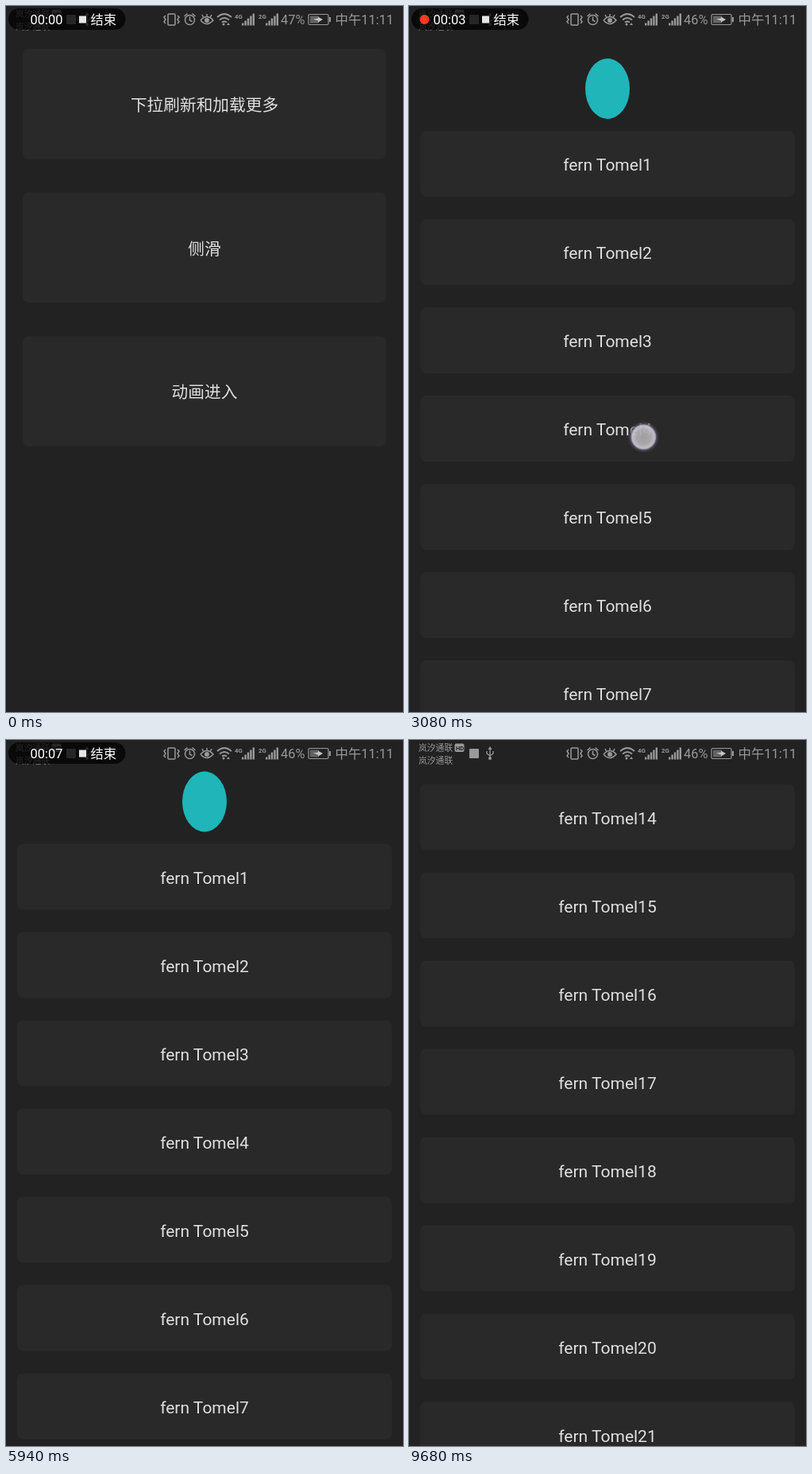
Write an HTML page that moves like this. It is 500 by 888 pixels and loops after 9900 ms.

```html
<!DOCTYPE html>
<html lang="zh">
<head>
<meta charset="utf-8">
<title>List refresh demo</title>
<style>
  html, body { margin: 0; width: 100%; height: 100%; overflow: hidden; background: #222; }
  svg { display: block; width: 500px; height: 888px; }
  text { font-family: Roboto, "Noto Sans CJK SC", "Noto Sans CJK", sans-serif; }
  .card { fill: #292929; }
  .label { fill: #e0e0e0; font-size: 21px; text-anchor: middle; }
  .home { font-size: 20.7px; }
  .status { fill: #999; font-size: 16.4px; }
  .carrier { font-size: 10.8px; }
  .net { font-size: 7.8px; font-weight: 700; }
  .line { fill: none; stroke: #999; stroke-width: 1.5; }
</style>
</head>
<body>
<svg viewBox="0 0 500 888">
  <defs>
    <radialGradient id="touchFill">
      <stop offset="0" stop-color="#a5a3a6"/>
      <stop offset=".45" stop-color="#b0aeb2"/>
      <stop offset=".68" stop-color="#c8c5ce"/>
      <stop offset=".74" stop-color="#a5a0b4"/>
      <stop offset=".8" stop-color="#575165" stop-opacity=".9"/>
      <stop offset="1" stop-color="#38343f" stop-opacity="0"/>
    </radialGradient>
  </defs>
  <rect width="500" height="888" fill="#222"/>
  <g id="home"></g>
  <g id="list">
    <g id="items"></g>
    <g id="footer">
      <g id="spinner"></g>
      <text x="196" y="2294.5" fill="#aaa" font-size="18.5">正在加载中...</text>
    </g>
  </g>
  <ellipse id="mascot" cx="250" fill="#1fb5b9"/>
  <rect width="500" height="33" fill="#222"/>

  <g class="status">
    <g class="carrier">
      <text x="12" y="13.5">岚汐通联</text>
      <text x="12" y="29.5">岚汐通联</text>
    </g>
    <rect x="57.5" y="4.5" width="12" height="10.5" rx="2"/>
    <text x="59" y="12.6" font-size="7.5" font-weight="700" style="fill:#222">HD</text>
    <rect x="76" y="11" width="12" height="12" rx="1"/>
    <path class="line" style="stroke-width:1.3" d="M102 11V23M98 14v3l4 3l4-3v-3"/>
    <path d="M102 8l2.5 4h-5z"/>
    <circle cx="102" cy="23" r="2"/>

    <rect class="line" x="204" y="10" width="9" height="14" rx="1"/>
    <path class="line" d="M201 12l-2 2l2 3l-2 3l2 2M216 12l2 2l-2 3l2 3l-2 2"/>
    <circle class="line" cx="231.5" cy="17.5" r="6"/>
    <path class="line" d="M231.5 13.5v4.5l3 1.5M224.5 13l4-3.5M238.5 13l-4-3.5"/>
    <path class="line" d="M245 18q8-9 16 0q-8 9-16 0M253 10v3M247 11l1.5 3M259 11l-1.5 3"/>
    <circle cx="253" cy="18" r="3"/>
    <path class="line" style="stroke-width:1.8" d="M266 14q9-8 18 0M269 17.5q6-5 12 0M272 20.5q3-2 6 0"/>
    <circle cx="274" cy="23" r="1.5"/>
    <path d="M278 24l2-3l2 3z"/>
    <text class="net" x="288" y="16">4G</text>
    <text class="net" x="318" y="16">2G</text>
    <g id="signal"></g>
    <text id="percent" x="346" y="23"></text>
    <rect class="line" style="stroke-width:1.2" x="381" y="10.5" width="25" height="13" rx="1.5"/>
    <rect x="383" y="12.5" width="11" height="9" opacity=".55"/>
    <path d="M387 16.5l6-1v-2l6 3.5l-6 3.5v-2z" style="fill:#c4c4c4"/>
    <rect x="407" y="14" width="2" height="6"/>
    <text x="414.5" y="23">中午11:11</text>
  </g>

  <g id="recorder" fill="#fff">
    <rect x="3" y="3" width="147.5" height="27" rx="13.5" fill="#000" opacity=".75"/>
    <circle id="recDot" cx="19.5" cy="17" r="6" fill="#ff3820"/>
    <text id="clock" x="30.5" y="23" font-size="16.5"></text>
    <rect x="92" y="12.5" width="9" height="9" fill="#e6e6e6"/>
    <text x="106.5" y="23" font-size="16.3">结束</text>
  </g>
  <circle id="touch" r="20.5" fill="url(#touchFill)" opacity=".95"/>
</svg>
<script>
const LOOP = 9900, STEP = 220;
const CARD_TOP = 47, PITCH = 111, REFRESH_HEIGHT = 83.5;
const OPEN_AT = 660, LOADED_AT = 9240, RECORD_END = 9680;
const $ = id => document.getElementById(id);

function add(parent, tag, attrs, text = '') {
  const node = document.createElementNS('http://www.w3.org/2000/svg', tag);
  for (const key in attrs) node.setAttribute(key, attrs[key]);
  node.textContent = text;
  return parent.appendChild(node);
}

function set(id, attrs) {
  for (const key in attrs) $(id).setAttribute(key, attrs[key]);
}

const show = (id, visible) => set(id, { visibility: visible ? 'visible' : 'hidden' });

// Linear interpolation through [time, value] points.
function track(points, t) {
  const next = points.findIndex(p => p[0] > t);
  if (next < 0) return points[points.length - 1][1];
  if (next === 0) return points[0][1];
  const [t0, v0] = points[next - 1], [t1, v1] = points[next];
  return v0 + (v1 - v0) * (t - t0) / (t1 - t0);
}

const clockTrack = [[0, 0], [880, 1.3], [2200, 2.6], [3740, 4.2], [5940, 7.1], [7920, 8.7], [9680, 10.4]];
const pullTrack = [[1320, 0], [1540, 45], [1980, 170], [2200, 209], [2420, 220], [2640, 203],
  [3080, 110], [3520, 27], [3740, 17], [3960, 35], [4400, 130], [4840, 190], [5060, 165],
  [5280, REFRESH_HEIGHT], [6380, REFRESH_HEIGHT], [6600, 0]];
const scrollTrack = [[6600, 0], [6820, 120], [7040, 530], [7260, 1010], [7480, 1350], [7700, 1434.5],
  [7920, 1557], [8140, 1540], [8360, 1450], [8580, 1434.5]];
const dragX = [[1320, 262], [2200, 277], [3300, 300], [3740, 301], [4840, 290]];

function touchPoint(t, pull) {
  if (t >= 220 && t < 440) return [290, 140];
  if (t >= 1320 && t < 5060) return [track(dragX, t), 335 + pull / 0.531];
  if (t >= 6820 && t < 7040) return [310, 520];
  if (t >= 7700 && t < 8140) return [327, track([[7700, 690], [7920, 523.5]], t)];
  return null;
}

['下拉刷新和加载更多', '侧滑', '动画进入'].forEach((name, i) => {
  const y = 54 + 180.6 * i;
  add($('home'), 'rect', { class: 'card', x: 21, y, width: 458, height: 138.5, rx: 8 });
  add($('home'), 'text', { class: 'label home', x: 250, y: y + 78 }, name);
});

const items = Array.from({ length: 30 }, (_, i) => {
  const item = add($('items'), 'g', {}), y = CARD_TOP + PITCH * i;
  add(item, 'rect', { class: 'card', x: 14, y, width: 472, height: 83, rx: 8 });
  add(item, 'text', { class: 'label', x: 250, y: y + 50 }, 'fern Tomel' + (i + 1));
  return item;
});

for (const x of [297, 327]) {
  for (let i = 0; i < 5; i++) {
    const height = 3 + 3 * i;
    add($('signal'), 'rect', { x: x + 3.4 * i, y: 24.5 - height, width: 2.4, height });
  }
}

// Ring whose tail fades away from its bright head.
const SEGMENTS = 36;
for (let i = 0; i < SEGMENTS; i++) {
  const point = n => {
    const a = n * 2 * Math.PI / SEGMENTS;
    return `${13.3 * Math.cos(a)} ${13.3 * Math.sin(a)}`;
  };
  add($('spinner'), 'path', {
    d: `M${point(i)}A13.3 13.3 0 0 1 ${point(i + 1.1)}`, fill: 'none',
    stroke: '#eee', 'stroke-width': 3.2, opacity: 0.95 - 0.65 * i / SEGMENTS
  });
}

function render(time) {
  const t = Math.floor(time % LOOP / STEP) * STEP;
  const opened = t >= OPEN_AT, loaded = t >= LOADED_AT;
  const pull = track(pullTrack, t), scroll = track(scrollTrack, t);

  set('home', { display: opened ? 'none' : 'inline' });
  set('list', { display: opened ? 'inline' : 'none', transform: `translate(0 ${pull - scroll})` });
  items.forEach((item, i) => item.setAttribute('display', i < 20 || loaded ? 'inline' : 'none'));
  set('footer', { display: loaded ? 'none' : 'inline' });
  set('spinner', { transform: `translate(171.5 2287) rotate(${(t - 7920) * 0.36})` });

  const grow = Math.min(1, pull / REFRESH_HEIGHT);
  set('mascot', {
    cy: CARD_TOP + pull - 14.3 - 38.7 * grow,
    rx: 28 * grow, ry: 38 * grow ** 1.25
  });

  const seconds = track(clockTrack, t);
  $('clock').textContent = '00:' + String(Math.floor(seconds)).padStart(2, '0');
  $('percent').textContent = opened ? '46%' : '47%';
  show('recorder', t < RECORD_END);
  show('recDot', t < RECORD_END && seconds % 1 >= 0.5);

  const touch = touchPoint(t, pull);
  show('touch', touch);
  if (touch) set('touch', { cx: touch[0], cy: touch[1] });
}

function tick() {
  render(performance.now());
  requestAnimationFrame(tick);
}
tick();
</script>
</body>
</html>
```
